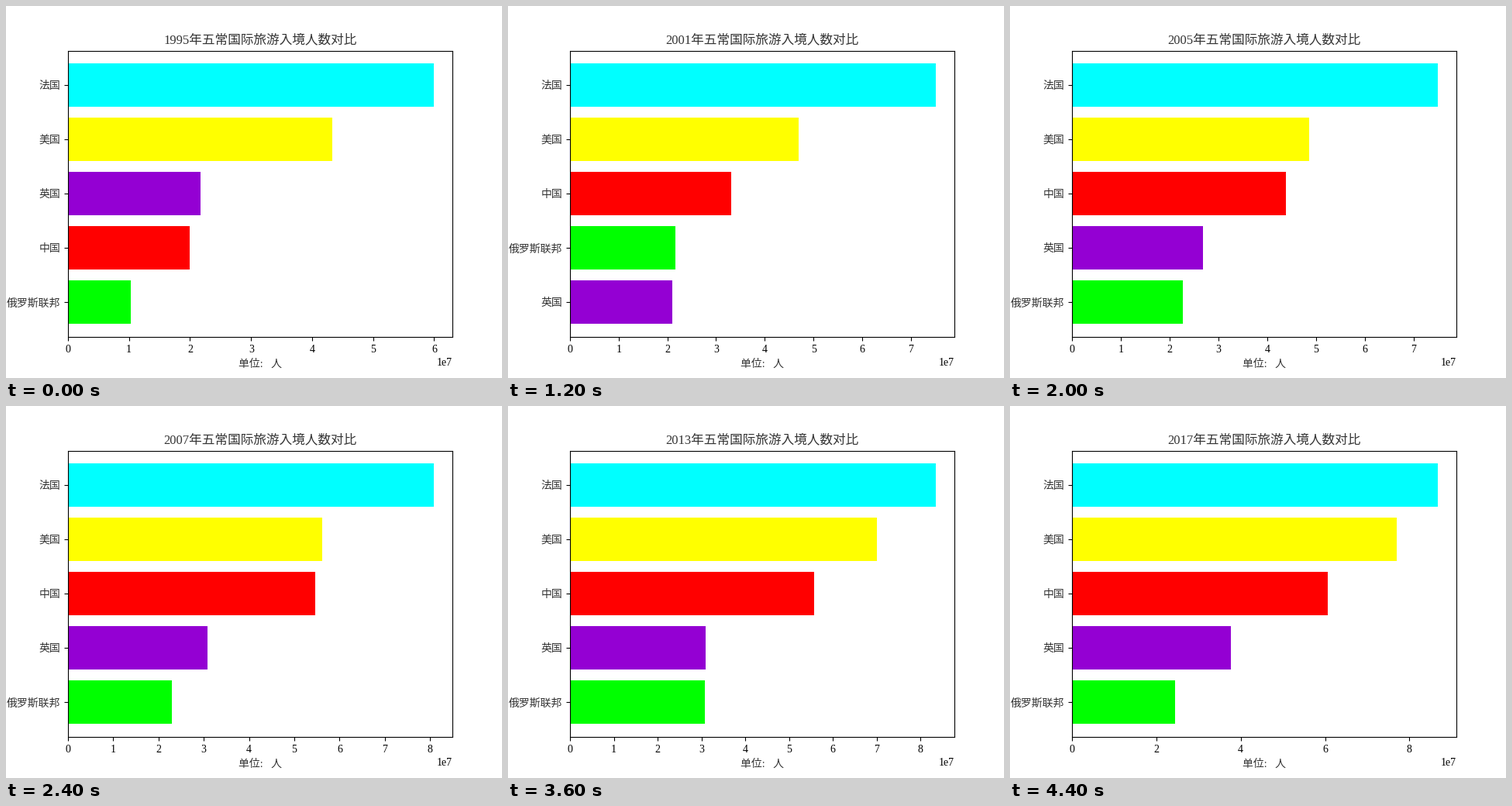
Animation of 640x480 px, one loop 4.6 s. Source, as a matplotlib script:

```python
import matplotlib.pyplot as plt
import numpy as np
from matplotlib.animation import FuncAnimation

plt.rcParams["font.family"] = ["Liberation Serif", "Noto Sans CJK JP"]

FIRST, LAST = 1995, 2017
FRAME_MS = 200
INK = "#333333"  # softens the sans glyphs to a thin stroke

# Turning points of each curve: year -> millions of arrivals.
COUNTRIES = {
    "法国": ("cyan", {1995: 60, 2000: 77.2, 2001: 75.2, 2002: 77, 2003: 75,
                    2005: 75, 2007: 80.9, 2010: 76.6, 2013: 83.6,
                    2016: 82.7, 2017: 86.8}),
    "美国": ("yellow", {1995: 43.3, 1998: 46.3, 2000: 51.2, 2001: 47,
                      2003: 41.2, 2007: 56.1, 2013: 70, 2015: 76.9}),
    "中国": ("red", {1995: 20, 1998: 25.1, 2001: 33.1, 2003: 33,
                   2007: 54.7, 2013: 55.7, 2017: 60.7}),
    "英国": ("darkviolet", {1995: 21.7, 1998: 23.7, 2001: 21, 2003: 22.8,
                          2007: 30.8, 2010: 28.3, 2013: 31, 2017: 37.7}),
    "俄罗斯联邦": ("lime", {1995: 10.3, 1998: 16.2, 2001: 21.6, 2003: 22.5,
                       2007: 22.9, 2010: 22.3, 2013: 30.8, 2015: 33.7,
                       2016: 24.4}),
}

fig, ax = plt.subplots(figsize=(6.4, 4.8), dpi=100)


def arrivals(points, year):
    return 1e6 * np.interp(year, list(points), list(points.values()))


def draw(i):
    year = FIRST + i
    ranked = sorted((arrivals(points, year), name, color)
                    for name, (color, points) in COUNTRIES.items())
    totals, names, colors = zip(*ranked)

    ax.clear()
    ax.barh(names, totals, color=colors)
    ax.tick_params(axis="y", labelcolor=INK)
    ax.set_title(f"{year}年五常国际旅游入境人数对比", color=INK, pad=6.7)
    # Spaces keep the colon on the left of its full-width cell.
    ax.set_xlabel("单位:   人", color=INK)


anim = FuncAnimation(fig, draw, frames=LAST - FIRST + 1,
                     init_func=lambda: None, interval=FRAME_MS,
                     repeat=True, repeat_delay=0)
plt.show()
```
